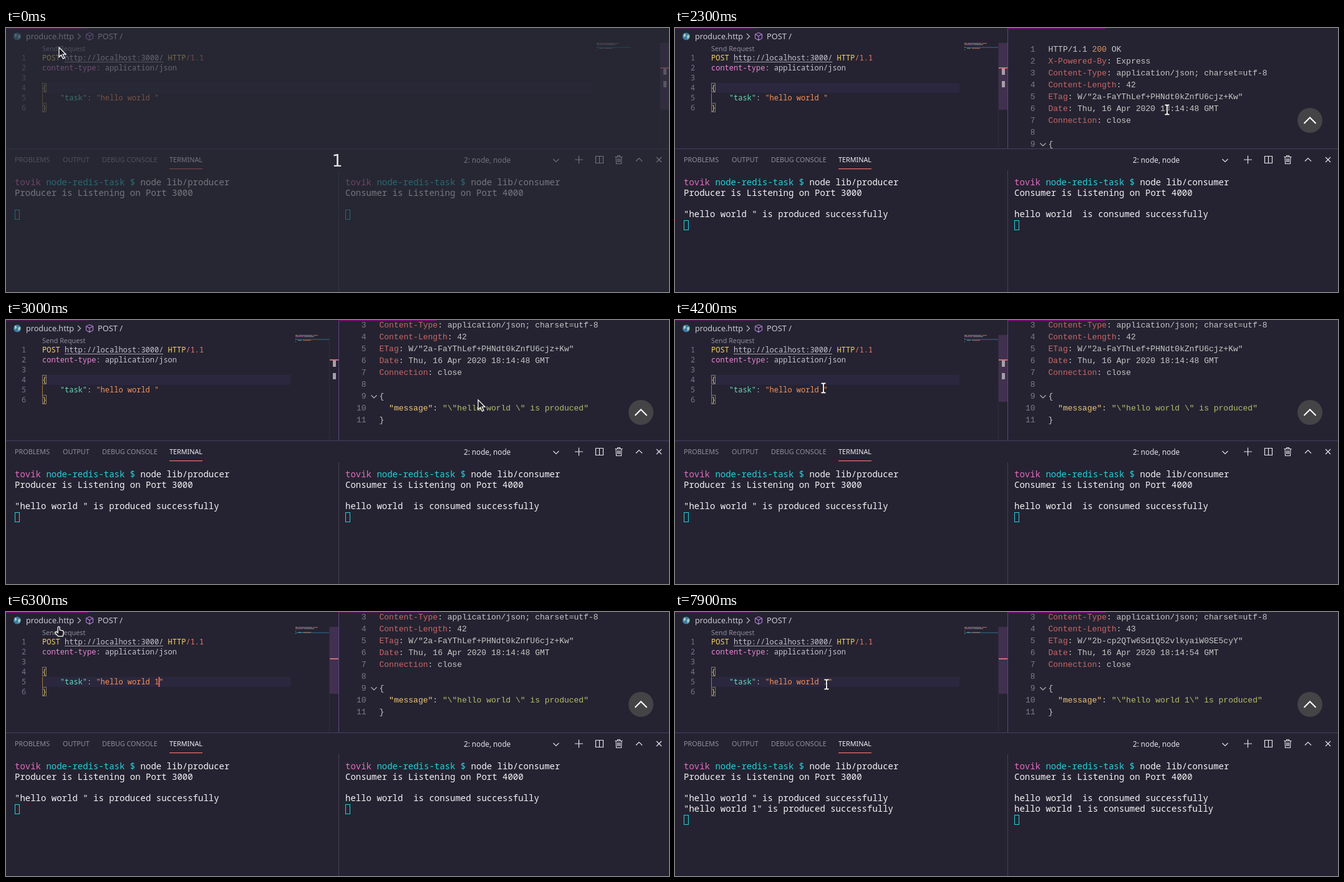
Animation, 1063 px wide and 423 px high, one loop 8000 ms. Source, as an HTML page:

```html
<!DOCTYPE html>
<html lang="en">
<head>
<meta charset="utf-8">
<title>Task queue demo</title>
<style>
html, body { margin: 0; width: 100%; height: 100%; overflow: hidden; background: #252331; }
svg { display: block; width: 1063px; height: 423px; }
text { white-space: pre; }
.code { font: 12px "Noto Sans Mono", monospace; }
.term { font: 14px "Noto Sans Mono", monospace; }
.resp { font: 13px "Liberation Mono", monospace; }
.ui { font-family: "Noto Sans", sans-serif; }
</style>
</head>
<body>
<svg id="stage" viewBox="0 0 1063 423"></svg>
<script>
const LOOP = 8000, STEP = 100;
const SENT = 1000, LOADED = 1400, CLICKED = 4300, TYPED = 5300, RESENT = 7000;
const GREY = '#c5c2cf', PINK = '#e66bc0', CYAN = '#26d0dc', WHITE = '#f4f4f6';
const BG = '#252331';

// time, x, y, pointer shape until the next key
const MOUSE = [
  [0, 85, 31, 'arrow'], [100, 92, 29, 'hand'], [700, 92, 29, 'hand'], [800, 104, 28, 'hand'],
  [1900, 115, 38, 'hand'], [2000, 290, 75, 'beam'], [2300, 789, 131, 'beam'],
  [2400, 795, 133, 'arrow'], [2700, 798, 134, 'arrow'], [3000, 757, 128, 'arrow'],
  [3300, 505, 126, 'beam'], [3600, 266, 122, 'beam'], [4200, 238, 109, 'beam'],
  [4300, 238, 109, 'beam'], [4500, 301, 157, 'beam'], [4600, 304, 160, 'beam'],
  [5300, 296, 150, 'beam'], [5600, 110, 38, 'beam'], [5700, 75, 18, 'hand'],
  [6000, 73, 18, 'hand'], [6200, 78, 21, 'hand'], [6500, 98, 28, 'hand'],
  [6800, 103, 28, 'hand'], [6900, 103, 28, 'hand'], [7000, 240, 100, 'beam'],
  [7100, 283, 136, 'beam'], [7500, 258, 124, 'beam'], [7900, 243, 116, 'beam']
];

const POINTERS = {
  arrow: '<path d="M0 0V15.5L3.6 12.2L6.4 18.2L9 17L6.2 11.2H11Z" fill="#1b1a22" stroke="#fff" stroke-width="1.3"/>',
  beam: '<path d="M-3.5 -7.5H-1L0 -6.5L1 -7.5H3.5M-3.5 7.5H-1L0 6.5L1 7.5H3.5M0 -6.5V6.5" fill="none" stroke="#111" stroke-width="3.6"/>' +
        '<path d="M-3.5 -7.5H-1L0 -6.5L1 -7.5H3.5M-3.5 7.5H-1L0 6.5L1 7.5H3.5M0 -6.5V6.5" fill="none" stroke="#fff" stroke-width="1.8"/>',
  hand: '<path d="M-1.5 8V1Q0 -1 1.5 1V5.5L6 6.5Q8 7 7.5 10L6.5 15.5H-1L-5.5 10.5Q-6 8 -3.5 8.5L-1.5 10Z" fill="#1b1a22" stroke="#fff" stroke-width="1.3"/>'
};

const esc = s => s.replace(/&/g, '&amp;').replace(/</g, '&lt;');
const lerp = (a, b, k) => a + (b - a) * k;
const ramp = (t, a, b) => Math.min(1, Math.max(0, (t - a) / (b - a)));

const rect = (x, y, w, h, fill, extra = '') =>
  `<rect x="${x}" y="${y}" width="${w}" height="${h}" fill="${fill}" ${extra}/>`;
const path = (d, stroke, width = 1, fill = 'none') =>
  `<path d="${d}" stroke="${stroke}" stroke-width="${width}" fill="${fill}"/>`;

// runs: alternating colour, string
function line(cls, x, y, ...runs) {
  let out = '';
  for (let i = 0; i < runs.length; i += 2) out += `<tspan fill="${runs[i]}">${esc(runs[i + 1])}</tspan>`;
  return `<text class="${cls}" x="${x}" y="${y}">${out}</text>`;
}
const label = (x, y, size, fill, s) =>
  `<text class="ui" x="${x}" y="${y}" font-size="${size}" fill="${fill}">${s}</text>`;

function mouseAt(t) {
  let i = MOUSE.length - 1;
  while (i && MOUSE[i][0] > t) i--;
  const a = MOUSE[i], b = MOUSE[i + 1] || a;
  const k = b === a ? 0 : (t - a[0]) / (b[0] - a[0]);
  const hop = a[3] !== b[3] && b[0] - a[0] > 500 ? 0 : k;
  return { x: lerp(a[1], b[1], hop), y: lerp(a[2], b[2], hop), shape: a[3] };
}

function breadcrumb(t) {
  const hover = t >= 5700 && t < 6200;
  return '<circle cx="18" cy="13.5" r="6" fill="#3c7ca6"/>' +
    path('M14 9Q18 9 17 13L14 15ZM19 12L23 11Q24 15 20 18Z', 'none', 0, '#a9cfb2') +
    label(32, 18, 12.6, hover ? '#f1f0f5' : '#cbc9d3', 'produce.http') +
    path('M115 9L119.5 13.5L115 18', '#b9b7c2', 1.2) +
    path('M134 7.5L139.5 10V16.5L134 19.5L128.5 16.5V10ZM128.5 10L134 13L139.5 10M134 13V19.5', '#b180d7', 1.1) +
    label(147, 18, 12.8, '#cbc9d3', 'POST /');
}

function minimap(x, row) {
  const y = 24, strip = (col, r, n, c) => rect(x + col, y + r * 2, n, 1.2, c, 'opacity=".7"');
  return rect(x, y + row * 2 + .5, 55, 1.5, '#2c5672') +
    strip(0, 0, 4, '#d8c15e') + strip(5, 0, 22, '#a5a3ad') + strip(28, 0, 8, '#d2775f') +
    strip(0, 1, 13, '#c573b5') + strip(14, 1, 16, '#a5a3ad') +
    strip(0, 3, 1, '#c9a860') + strip(4, 4, 6, '#54b8a2') + strip(12, 4, 13, '#cf7d50') +
    strip(0, 5, 1, '#c9a860');
}

function editor(t) {
  const split = t >= SENT, right = split ? 533 : 1063;
  const mapX = split ? 464 : 947;
  const row = t >= CLICKED ? 4 : 3;
  const rowY = 40 + row * 16;
  const hover = t >= 100 && t < 1900 || t >= 6500 && t < RESENT;
  const slider = 1 - ramp(t, 2500, 2800) + ramp(t, 3200, 3400);
  const word = 'hello world ' + (t >= TYPED ? '1' : '');
  let out = rect(58, rowY, mapX - 66, 16, '#2a273e');

  for (let i = 0; i < 6; i++) out += line('code', 25, 52 + i * 16, '#77758a', String(i + 1));
  out += label(58, 37, 10.8, hover ? '#4e94ce' : '#8f8d99', 'Send Request');
  out += line('code', 58, 52, '#f3d565', 'POST ', GREY, 'http://localhost:3000/', '#f3d565', ' HTTP', '#f47a6b', '/1.1');
  out += path('M94 54.5H252', '#a5a3ad');
  out += line('code', 58, 68, '#ea83d4', 'content-type', GREY, ': application/json');
  for (const y of [88, 120]) {
    out += rect(58.5, y + .5, 6, 14, 'none', 'stroke="#807a6c"');
    out += line('code', 58, y + 12, '#eac45c', y < 100 ? '{' : '}');
  }
  out += path('M58.5 104V120', '#a5783a');
  out += line('code', 86.8, 116, '#60dfb9', '"task"', GREY, ': ', '#f99157', `"${word}"`);

  const caretEarly = t >= 300 && t < 800;
  const caretLate = t >= CLICKED && t < 6900 && Math.floor((t - CLICKED) / 500) % 2 === 0;
  if (caretEarly) out += rect(65, 88, 2, 16, '#f0645d');
  if (caretLate) out += rect(t >= TYPED ? 244.5 : 237.5, 104, 2, 16, '#f0645d');

  out += minimap(mapX, row);
  out += rect(right - 14, 24, 14, 107, '#41304f', `opacity="${slider}"`);
  out += path(`M${right - 14.5} 24V193`, '#2e2b3b');
  if (row === 3) out += rect(right - 9, 65, 5, 10, '#a3a1a6') + rect(right - 9, 85, 5, 10, '#a3a1a6');
  out += rect(right - 14, row === 3 ? 63 : 74, 14, 2, '#c97079');
  return out;
}

function response(t) {
  if (t < SENT) return '';
  let out = path('M533.5 0V193', '#5b4785');
  if (t < LOADED) return out;
  const again = t >= RESENT;
  const top = 64 * ramp(t, 2300, 2700);
  const C = '#c5c8c6', N = '#cc6666';
  const head = (k, v) => [N, k, C, ': ' + v];
  const rows = [
    [C, 'HTTP/1.1 ', '#de935f', '200', C, ' OK'],
    head('X-Powered-By', 'Express'),
    head('Content-Type', 'application/json; charset=utf-8'),
    head('Content-Length', again ? '43' : '42'),
    head('ETag', again ? 'W/"2b-cp2QTw6Sd1Q52vlkyaiW0SE5cyY"' : 'W/"2a-FaYThLef+PHNdt0kZnfU6cjz+Kw"'),
    head('Date', `Thu, 16 Apr 2020 18:14:${again ? 54 : 48} GMT`),
    head('Connection', 'close'),
    [C, ''],
    [C, '{'],
    [C, '  ', '#f0c674', '"message"', C, ': ', '#b5bd68', `"\\"hello world ${again ? '1' : ''}\\" is produced"`],
    [C, '}']
  ];
  out += '<g clip-path="url(#pane)">';
  rows.forEach((r, i) => {
    const y = 38 + i * 19 - top, n = String(i + 1);
    if (y > 205) return;
    out += line('resp', 577.5 - n.length * 7.8, y, '#7b7a83', n) + line('resp', 598.5, y, ...r);
    if (i === 8) out += path(`M585.5 ${y - 5.5}L590 ${y - 1}L594.5 ${y - 5.5}`, '#b5b4bc', 1.2);
  });
  return out + '</g><circle cx="1018" cy="148" r="20" fill="#444346"/>' +
    path('M1008.5 153L1018 143.5L1027.5 153', '#fff', 2);
}

function tabLine(t) {
  const rightOn = t >= SENT && t < CLICKED || t >= RESENT;
  const bar = (x, w, on) => rect(x, 0, w, 1.5, '#86087f', `opacity="${on ? 1 : .45}"`);
  return bar(0, 132, !rightOn) + (t >= SENT ? bar(533, 157, rightOn) : '');
}

function panelHead() {
  const tabs = [[14, 'PROBLEMS'], [91, 'OUTPUT'], [154, 'DEBUG CONSOLE'], [262, 'TERMINAL']];
  const ink = '#e4e3e9';
  return path('M0 193.5H1063', '#453d63') + path('M533.5 228V423', '#454252') +
    tabs.map(([x, s], i) => label(x, 215, 10.8, i === 3 ? '#f0eff4' : '#918f9b', s)).join('') +
    rect(262, 225, 53, 1.2, '#f0716a') +
    label(734, 215.5, 11.7, ink, '2: node, node') +
    path('M877.5 210L882 214.5L886.5 210', ink, 1.1) +
    path('M912 211H925M918.5 204.5V217.5', ink, 1.2) +
    path('M945.5 205.5H957.5V216.5H945.5ZM951.5 205.5V216.5', ink, 1.2) +
    path('M976.5 206.5H988.5M980.5 206V204.5H984.5V206M978 207L978.5 217.5H986.5L987 207M980.5 209V215M982.5 209V215M984.5 209V215', ink, 1.1) +
    path('M1010 213.5L1015 208.5L1020 213.5', ink, 1.2) +
    path('M1043 207L1051 215M1051 207L1043 215', ink, 1.2);
}

function terminal(x, name, port, logs) {
  const title = name[0].toUpperCase() + name.slice(1);
  const y = 291 + logs.length * 17;
  return line('term', x, 252, PINK, 'tovik ', CYAN, 'node-redis-task $', WHITE, ' node lib/' + name) +
    line('term', x, 269, WHITE, `${title} is Listening on Port ${port}`) +
    logs.map((s, i) => line('term', x, 303 + i * 17, WHITE, s)).join('') +
    rect(x + .5, y + .5, 7, 15, 'none', `stroke="${CYAN}"`);
}

function scene(t) {
  const sent = [];
  if (t >= SENT) sent.push('');
  if (t >= RESENT) sent.push('1');
  const m = mouseAt(t);
  let out = '<defs><clipPath id="pane"><rect x="534" y="1" width="529" height="192"/></clipPath></defs>' +
    rect(0, 0, 1063, 423, BG) + breadcrumb(t) + editor(t) + response(t) + tabLine(t) + panelHead() +
    terminal(14, 'producer', 3000, sent.map(s => `"hello world ${s}" is produced successfully`)) +
    terminal(544, 'consumer', 4000, sent.map(s => `hello world ${s} is consumed successfully`));
  if (t < 100) {
    out += rect(0, 0, 1063, 423, '#282a34', 'opacity=".62"') +
      '<text x="531" y="222" text-anchor="middle" font-family="DejaVu Sans, sans-serif" font-size="27" fill="#e2e2e4">1</text>';
  }
  return out + `<g transform="translate(${m.x} ${m.y})">${POINTERS[m.shape]}</g>`;
}

const stage = document.getElementById('stage');
const start = performance.now();
let shown = -1;
function tick() {
  const t = Math.floor((performance.now() - start) % LOOP / STEP) * STEP;
  if (t !== shown) stage.innerHTML = scene(shown = t);
  requestAnimationFrame(tick);
}
tick();
</script>
</body>
</html>
```
